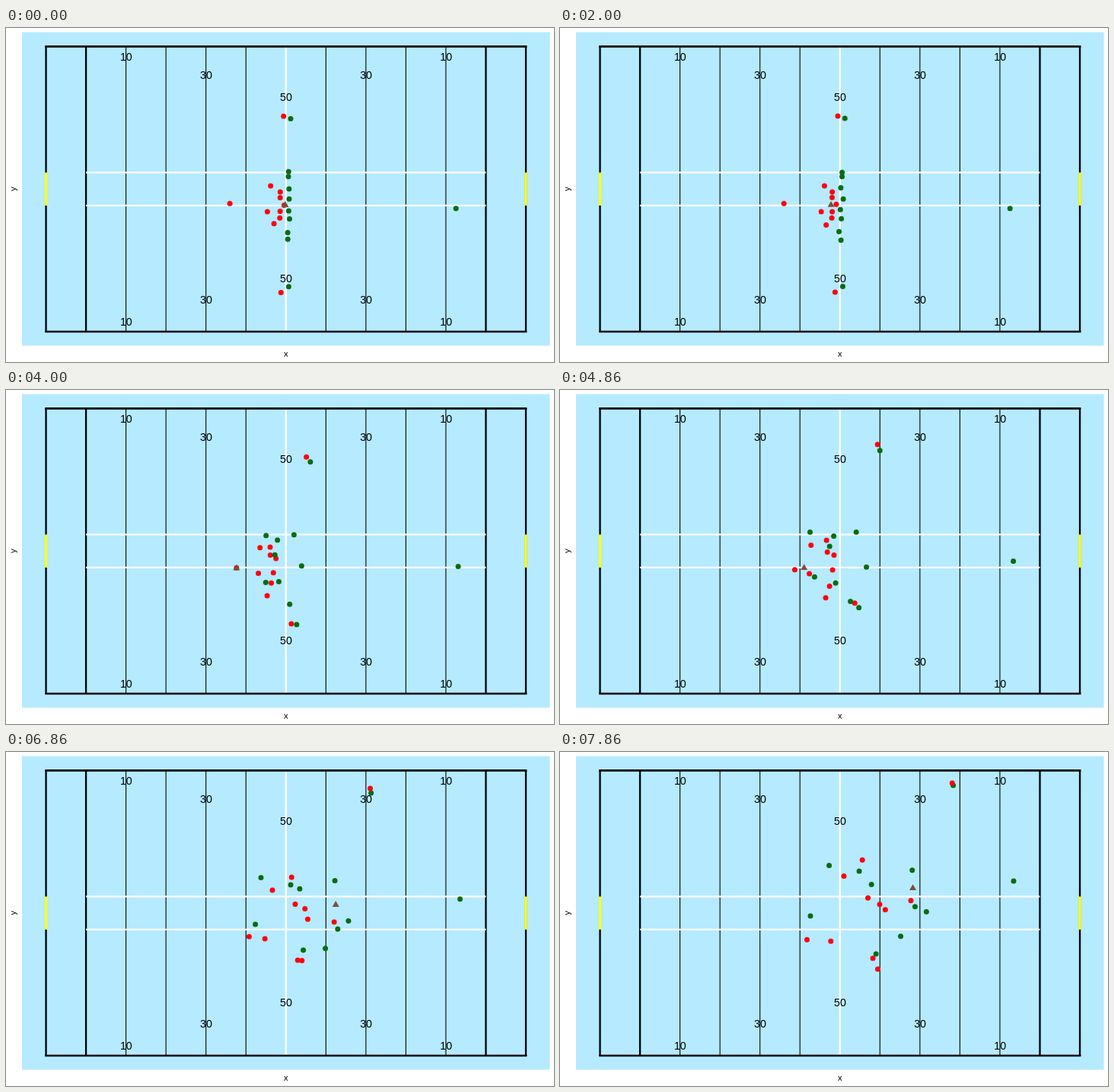
Write an HTML page that moves like this. It is 720 px wide and 440 px high and loops after 8000 ms.

```html
<!DOCTYPE html>
<html lang="en">
<head>
<meta charset="utf-8">
<title>Play tracking</title>
<style>
  html, body { margin: 0; width: 100%; height: 100%; overflow: hidden; background: #fff; }
  svg { display: block; width: 720px; height: 440px; }
  text { font-family: "Liberation Sans", Arial, sans-serif; text-anchor: middle; }
</style>
</head>
<body>
<svg id="stage" viewBox="0 0 720 440"></svg>
<script>
const stage = document.getElementById('stage');
const RED = '#ff0010', GREEN = '#0a6c12', BROWN = '#7b5138';
const LOOP = 8000, FPS = 7;
// Moments of the play, in steps
const SNAP = 12.5, CATCH = 22.5, THROW = 33, BREAK = 41, END = 55;

function add(tag, attrs, label) {
  const el = document.createElementNS('http://www.w3.org/2000/svg', tag);
  for (const name in attrs) el.setAttribute(name, attrs[name]);
  if (label) el.textContent = label;
  return stage.appendChild(el);
}
const line = (x1, y1, x2, y2, stroke, width, cap = 'butt') =>
  add('line', { x1, y1, x2, y2, stroke, 'stroke-width': width, 'stroke-linecap': cap });

// Pitch
const TOP = 24.4, BOTTOM = 400, HASH = [190.4, 233.9];
const yardX = yard => 105.1 + yard * 5.254;
const across = (yard, stroke, width) => line(yardX(yard), TOP, yardX(yard), BOTTOM, stroke, width);

add('rect', { x: 21, y: 5.5, width: 693.5, height: 413, fill: '#b5eaff' });
for (let yard = 10; yard < 100; yard += 10)
  if (yard !== 50) across(yard, '#000', 1.1);
across(50, '#fff', 2.4);
for (const yard of [-10, 0, 100, 110]) across(yard, '#000', 2.3);
for (const y of [TOP, BOTTOM]) line(yardX(-10), y, yardX(110), y, '#000', 2.7, 'square');
for (const y of HASH) line(yardX(0), y, yardX(100), y, '#fff', 2.3);
for (const yard of [-10, 110]) line(yardX(yard), HASH[0], yardX(yard), HASH[1], '#ffff10', 3.2);

const rows = { 10: [43.2, 392.2], 30: [67.2, 363.2], 50: [96.2, 335.2] };
for (const yard of [10, 30, 50, 70, 90]) {
  const shown = Math.min(yard, 100 - yard);
  for (const y of rows[shown]) add('text', { x: yardX(yard) + 0.2, y, 'font-size': 14.23 }, shown);
}
add('text', { x: 367.7, y: 433, 'font-size': 11 }, 'x');
add('text', { transform: 'translate(13 212) rotate(-90)', 'font-size': 11 }, 'y');

// Smooth motion a -> b -> c; the first leg starts from rest or at full pace
function glide([t0, t1, t2], [a, b, c], fromRest) {
  const h0 = t1 - t0, h1 = t2 - t1, d0 = (b - a) / h0, d1 = (c - b) / h1;
  const turn = (d0 * h1 + d1 * h0) / (h0 + h1);
  const launch = fromRest ? 0 : 2 * d0 - turn;
  return t => {
    if (t <= t0) return a;
    if (t >= t1) return b + (t - t1) * (turn + (d1 - turn) * (t - t1) / h1);
    const u = (t - t0) / h0, v = 1 - u;
    return a + (b - a) * u + h0 * u * v * ((launch - d0) * v - (turn - d0) * u);
  };
}
function route(times, path, fromRest) {
  const points = path.split(' ').map(p => p.split(',').map(Number));
  const [x, y] = [0, 1].map(axis => glide(times, points.map(p => p[axis]), fromRest));
  return t => [x(t), y(t)];
}

const movers = [];
function player(fill, path, fromRest) {
  const at = route([SNAP, BREAK, END], path, fromRest);
  movers.push({ el: add('circle', { r: 3.5, fill }), at });
  return at;
}
// Paths: line-up, break, finish. Runners wait and accelerate, linemen fire off at the snap.
const runner = (fill, path) => player(fill, path, true);
const lineman = (fill, path) => player(fill, path, false);

runner(GREEN, '374,119.4 448,64.9 516.6,44');
runner(RED, '364.7,116.3 446.5,57 515.3,40.9');
runner(RED, '347.7,208 334.5,196 373,163.6');
runner(RED, '343.4,241.9 329.9,243.4 355.8,249.3');
runner(RED, '361.3,348.6 406.6,251 461,195.8');
const kicker = runner(RED, '294.1,231.2 314.4,239.8 324.5,247.3');

lineman(RED, '360.3,216.1 359.6,183.6 397.2,142.3');
lineman(RED, '360.2,223.6 362.2,207.7 404.6,192.2');
lineman(RED, '365.5,233.4 372.8,212 420,200.8');
lineman(RED, '360.2,241.4 373.4,230 427.4,207.7');
lineman(RED, '359.8,250.2 367.7,265.6 417.5,286');
lineman(RED, '352.1,257.7 362.6,275 411.1,271.7');

runner(GREEN, '371,195.7 324.9,178.2 353.6,149.5');
runner(GREEN, '372,225.2 423.8,230.5 481.4,210.6');
runner(GREEN, '371.4,340.8 411.1,260 466.5,203.8');
runner(GREEN, '591.2,237.8 596.6,212.5 596,170');

lineman(GREEN, '371.3,189.3 407.6,179.9 462.8,155.7');
lineman(GREEN, '371.9,212 369.4,186.3 409.2,174.4');
lineman(GREEN, '371.4,241.1 361.1,191.2 393.1,157');
lineman(GREEN, '372.5,251.5 372.9,257.1 415.2,266.1');
lineman(GREEN, '370.1,269.5 329.4,237 329,216');
lineman(GREEN, '370.2,278.2 397.6,270.6 447.6,242.7');

// Ball: snapped straight to the kicker, carried, then thrown
const flight = route([THROW, BREAK, END], '310,235.6 385.6,219 463.6,178.8');
function ballAt(t) {
  if (t >= THROW) return flight(t);
  const u = Math.min(1, Math.max(0, (t - SNAP) / (CATCH - SNAP)));
  const [x, y] = kicker(t);
  return [367 + (x - 367) * u, 232.7 + (y - 232.7) * u];
}
movers.push({ el: add('path', { d: 'M0-4.6L4.5 3.3H-4.5Z', fill: BROWN }), at: ballAt });

// Whole steps, each starting on a hundredth of a second
const startOf = step => Math.round(step * 100 / FPS) * 10;
function draw(ms) {
  const t = ms % LOOP;
  let step = Math.round(t * FPS / 1000);
  if (t < startOf(step)) step--;
  for (const { el, at } of movers) {
    const [x, y] = at(step);
    el.setAttribute('transform', `translate(${x.toFixed(2)} ${y.toFixed(2)})`);
  }
}

const begin = performance.now();
function tick() {
  draw(Math.max(0, performance.now() - begin));
  requestAnimationFrame(tick);
}
tick();
</script>
</body>
</html>
```
